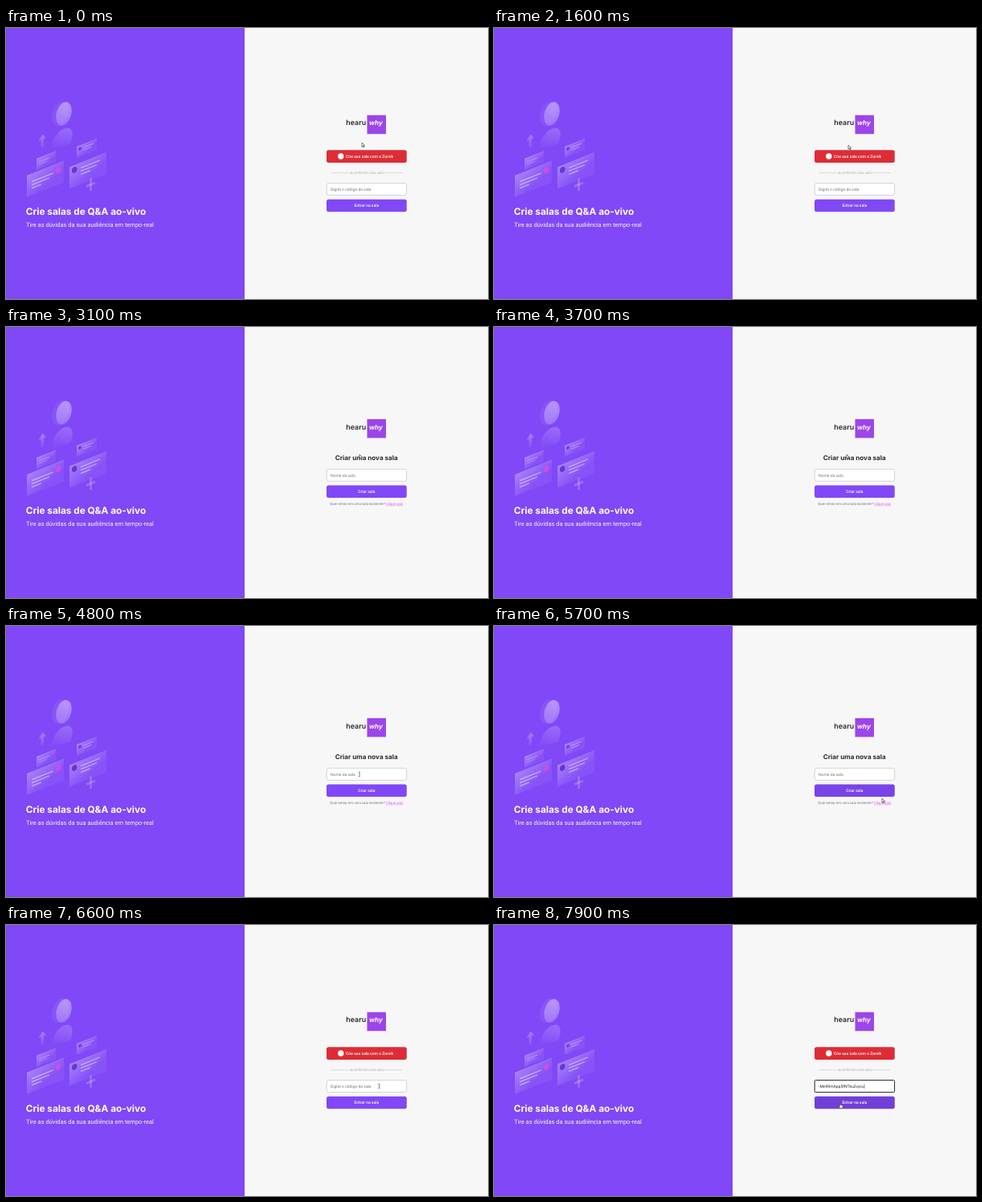
Write an HTML page with a canvas that moves like this. It is 600x338 px and loops after 8000 ms.

```html
<!DOCTYPE html>
<html lang="pt-BR">
<head>
<meta charset="utf-8">
<title>Salas de Q&amp;A</title>
<style>
html, body { margin: 0; width: 100%; height: 100%; overflow: hidden; background: #f7f7f8; }
canvas { display: block; width: 600px; height: 338px; }
</style>
</head>
<body>
<canvas id="stage"></canvas>
<script>
const W = 600, H = 338, LOOP = 8000, STEP = 100;
const PURPLE = '#8048f6', RED = '#de2c36', INK = '#29292e', GREY = '#a8a8b3';
const BODY = 'Roboto, sans-serif', HEAD = 'Inter, sans-serif';
const canvas = document.getElementById('stage');
const ctx = canvas.getContext('2d');
const dpr = window.devicePixelRatio || 1;
canvas.width = W * dpr;
canvas.height = H * dpr;

// time, x, y of the pointer
const PATH = [
  [0, 443, 143], [800, 443, 143], [1600, 441, 146], [1700, 441, 146],
  [2300, 441, 159], [2600, 440.5, 159], [3200, 440, 159], [3700, 439, 159],
  [4300, 439, 182], [4600, 440, 185], [4800, 440, 185], [5300, 467, 205],
  [5700, 483, 215], [5900, 484, 219.5], [6200, 484, 219.5], [6600, 464.5, 201],
  [7200, 464.5, 201], [7700, 431, 222.5], [8000, 431, 222.5]
];
const CREATE_AT = 3000, HOME_AT = 6200, FOCUS_AT = 6900, PASTE_AT = 7200;

const clamp = v => Math.max(0, Math.min(1, v));
const ease = k => k * k * (3 - 2 * k);

function pointer(t) {
  let i = 1;
  while (i < PATH.length - 1 && t > PATH[i][0]) i++;
  const [t0, x0, y0] = PATH[i - 1], [t1, x1, y1] = PATH[i];
  const k = ease(clamp((t - t0) / (t1 - t0)));
  return { x: x0 + (x1 - x0) * k, y: y0 + (y1 - y0) * k };
}

// Strength of a hover that fades in and out over 200 ms
const hover = (t, from, to) => Math.min(clamp((t - from) / 200), clamp((to + 200 - t) / 200));

function text(str, x, y, font, color, align = 'left') {
  ctx.font = font;
  ctx.fillStyle = color;
  ctx.textAlign = align;
  ctx.fillText(str, x, y);
}

function box(x, y, w, h, r, fill) {
  ctx.beginPath();
  ctx.roundRect(x, y, w, h, r);
  ctx.fillStyle = fill;
  ctx.fill();
}

function poly(points, fill) {
  ctx.beginPath();
  points.forEach(([x, y]) => ctx.lineTo(x, y));
  ctx.closePath();
  ctx.fillStyle = fill;
  ctx.fill();
}

function oval(x, y, rx, ry, turn, fill) {
  ctx.beginPath();
  ctx.ellipse(x, y, rx, ry, turn, 0, Math.PI * 2);
  ctx.fillStyle = fill;
  ctx.fill();
}

function line(x0, y0, x1, y1, width, color) {
  ctx.beginPath();
  ctx.moveTo(x0, y0);
  ctx.lineTo(x1, y1);
  ctx.lineWidth = width;
  ctx.strokeStyle = color;
  ctx.stroke();
}

const white = a => `rgba(255,255,255,${a})`;

function fade(x0, y0, x1, y1, a0, a1) {
  const g = ctx.createLinearGradient(x0, y0, x1, y1);
  g.addColorStop(0, white(a0));
  g.addColorStop(1, white(a1));
  return g;
}

// Slanted message card; x, y is its upper left corner
function card(x, y, w, h, dot, dotX, dotY, barX, bars) {
  const slope = -0.4, s = w / 46;
  ctx.save();
  ctx.transform(1, slope, 0, 1, x, y);
  box(0, 0, w, h, 0.8 * s, fade(0, 0, w * 0.3, h, 0.32, 0.06));
  line(0, 0.3, w, 0.3, 0.5, white(0.15));
  oval(dotX, dotY, 3.3 * s, 3.7 * s, 0, dot);
  bars.forEach(([len, row]) => box(barX, row, len, 1.3 * s, 0.6 * s, white(0.5)));
  ctx.restore();
}

function illustration() {
  // Figure: head and shoulders
  oval(67.5, 107, 10, 16, 0.3, white(0.06));
  oval(72, 107, 9.2, 15, 0.28, fade(76, 93, 66, 122, 0.4, 0.2));
  ctx.beginPath();
  ctx.moveTo(56, 153);
  ctx.bezierCurveTo(57, 138, 66, 125, 77, 124.5);
  ctx.bezierCurveTo(84, 125, 84, 136, 80, 144);
  ctx.closePath();
  ctx.fillStyle = fade(72, 124, 67, 151, 0.2, 0.01);
  ctx.fill();

  card(38, 163, 24, 14, '#c84fe8', 20.5, 3.2, 3, [[13, 5], [10, 8]]);
  card(88, 148, 25, 14, '#6a3bd0', 4, 4.2, 8, [[13, 4], [10, 7]]);
  card(26, 184, 46, 27, '#d14be4', 39.2, 9, 6, [[27, 9.5], [22, 13.5], [12, 17.5]]);
  card(79, 173.5, 46, 27, '#6537cf', 6.2, 6, 14, [[24, 6], [20, 10], [12, 14]]);

  poly([[40.5, 141], [45.5, 132.5], [50, 137.5], [47, 138.5], [47, 148.5], [43.5, 150], [43.5, 140]],
    fade(45, 132, 45, 150, 0.3, 0.06));
  ctx.lineCap = 'butt';
  line(100, 197.5, 111, 193, 2.6, white(0.22));
  line(105.5, 187.5, 105.5, 203, 2.6, white(0.22));
}

function aside() {
  ctx.fillStyle = PURPLE;
  ctx.fillRect(0, 0, 297, H);
  illustration();
  text('Crie salas de Q&A ao-vivo', 24.7, 232.7, '700 11.8px ' + HEAD, '#fff');
  text('Tire as dúvidas da sua audiência em tempo-real', 25, 247.7, '7.5px ' + BODY, '#f8f8f8');
}

function brand(y) {
  ctx.fillStyle = '#9c45ea';
  ctx.fillRect(449.5, y, 23.5, 23.5);
  text('hearu', 423.3, y + 12.6, '600 8.9px ' + HEAD, INK);
  text('why', 452, y + 12.6, 'italic 700 8.2px ' + HEAD, '#fff');
}

function button(y, label, fill, lit, x = 448.8, align = 'center') {
  box(399, y, 99.8, 15.6, 2.5, fill);
  if (lit > 0) box(399, y, 99.8, 15.6, 2.5, `rgba(0,0,0,${0.12 * lit})`);
  text(label, x, y + 9.6, '500 5px ' + BODY, '#fff', align);
}

function field(y, str, color, focused) {
  box(399, y, 99.8, 15.4, 2.5, '#fff');
  ctx.beginPath();
  ctx.roundRect(399.2, y + 0.2, 99.4, 15, focused ? 1 : 2.4);
  ctx.lineWidth = focused ? 1 : 0.5;
  ctx.strokeStyle = focused ? '#25252a' : GREY;
  ctx.stroke();
  text(str, 404, y + 9.4, '5px ' + BODY, color);
}

function home(t) {
  brand(108.7);
  button(152.3, 'Crie sua sala com o Zorvik', RED, hover(t, 1900, CREATE_AT), 423, 'left');
  oval(416.8, 160, 3.7, 3.7, 0, '#fff');
  line(404.5, 180.7, 426.5, 180.7, 0.4, GREY);
  line(471, 180.7, 493.5, 180.7, 0.4, GREY);
  text('ou entre em uma sala', 448.8, 182, '4.375px ' + BODY, GREY, 'center');

  const focused = t >= FOCUS_AT, pasted = t >= PASTE_AT;
  if (pasted) field(193.4, '-Mn49mApq5fNTku2vycu', '#222', focused);
  else field(193.4, 'Digite o código da sala', '#757575', focused);
  if (focused) {
    const x = pasted ? 404.3 + ctx.measureText('-Mn49mApq5fNTku2vycu').width : 404;
    line(x, 198.3, x, 204.3, 0.4, '#222');
  }
  button(213.7, 'Entrar na sala', PURPLE, hover(t, 7500, LOOP));
}

function create(t) {
  brand(114.9);
  text('Criar uma nova sala', 448.7, 166.4, '700 8.1px ' + HEAD, INK, 'center');
  field(177.1, 'Nome da sala', '#757575', false);
  button(197.4, 'Criar sala', PURPLE, hover(t, 5100, 5600));

  const ask = 'Quer entrar em uma sala existente? ', link = 'Clique aqui';
  ctx.font = '4.375px ' + BODY;
  const askW = ctx.measureText(ask).width, linkW = ctx.measureText(link).width;
  const x = 448.8 - (askW + linkW) / 2;
  text(ask, x, 222, ctx.font, '#737380');
  text(link, x + askW, 222, ctx.font, '#e559f9');
  line(x + askW, 222.8, x + askW + linkW, 222.8, 0.4, '#e559f9');
}

function outlined(points, x, y) {
  ctx.save();
  ctx.translate(x, y);
  ctx.beginPath();
  points.forEach(([px, py]) => ctx.lineTo(px, py));
  ctx.closePath();
  ctx.lineJoin = 'round';
  ctx.lineWidth = 0.65;
  ctx.strokeStyle = '#303036';
  ctx.fillStyle = '#fff';
  ctx.fill();
  ctx.stroke();
  ctx.restore();
}

const ARROW = [[0, 0], [0, 5.2], [1.2, 4.1], [2, 5.9], [2.8, 5.5], [2, 3.8], [3.7, 3.8]];
const HAND = [[-0.6, 0], [0.4, 0], [0.5, 2], [3, 2.5], [3.3, 4], [2.6, 6], [-0.4, 6], [-2, 3.6], [-1.4, 3.1], [-0.6, 3.8]];

function ibeam(x, y) {
  line(x, y - 2.6, x, y + 2.6, 0.6, '#333');
  line(x - 1.1, y - 2.7, x + 1.1, y - 2.7, 0.5, '#333');
  line(x - 1.1, y + 2.7, x + 1.1, y + 2.7, 0.5, '#333');
}

function cursor(t, creating) {
  const { x, y } = pointer(t);
  const within = (x0, y0, x1, y1) => x >= x0 && x <= x1 && y >= y0 && y <= y1;
  const hand = creating
    ? within(399, 197.4, 499, 213) || within(473, 218, 495, 223)
    : within(399, 152.3, 499, 168) || within(399, 213.7, 499, 229.3);
  const beam = creating
    ? within(409, 177, 489, 192.5)
    : within(399, 193.4, 499, 209);
  if (hand) outlined(HAND, x, y);
  else if (beam) ibeam(x, y);
  else outlined(ARROW, x, y);
}

function draw(t) {
  const creating = t >= CREATE_AT && t < HOME_AT;
  ctx.setTransform(dpr, 0, 0, dpr, 0, 0);
  ctx.textRendering = 'geometricPrecision';
  ctx.fillStyle = '#f7f7f8';
  ctx.fillRect(0, 0, W, H);
  aside();
  if (creating) create(t);
  else home(t);
  cursor(t, creating);
}

const start = performance.now();
function tick() {
  const t = (performance.now() - start) % LOOP;
  draw(Math.floor(t / STEP) * STEP);
  requestAnimationFrame(tick);
}
tick();
</script>
</body>
</html>
```
